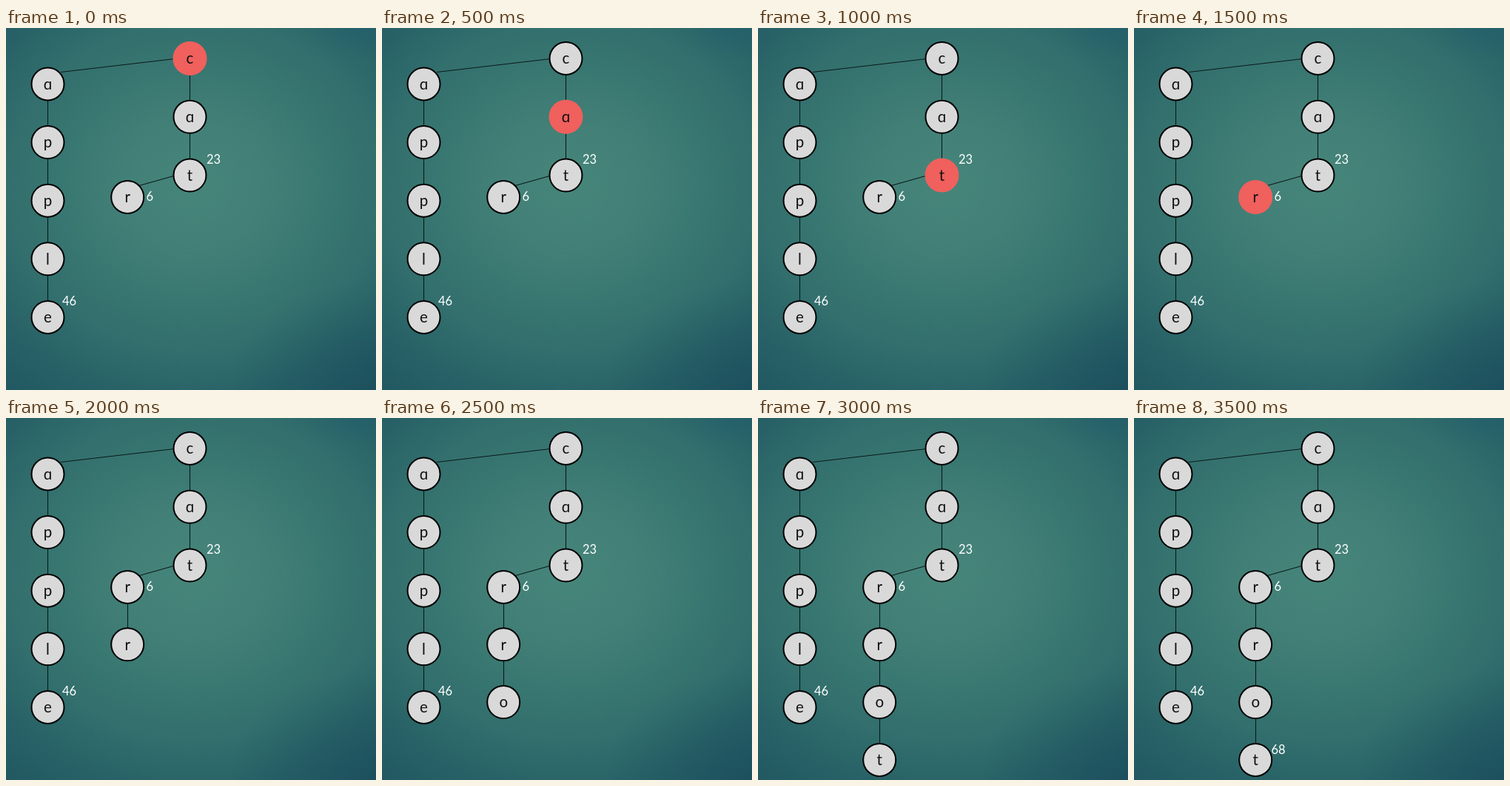
These frames come from a looping animation (500 px wide and 488 px high, 4 s). An HTML page:

```html
<!DOCTYPE html>
<html lang="en">
<head>
<meta charset="utf-8">
<title>Trie insertion</title>
<style>
  html, body { margin: 0; width: 100%; height: 100%; overflow: hidden; }
  body {
    background:
      radial-gradient(ellipse 70px 40px at 475px 0, #23606e99, #23606e00),
      radial-gradient(ellipse 200px 150px at 500px 488px, #17485a88, #17485a00),
      radial-gradient(ellipse 420px 370px at 255px 212px,
        #46857a, #42817830 0, #42817800 0),
      radial-gradient(ellipse 420px 370px at 255px 212px,
        #46857a 0, #438178 20%, #3a7872 40%, #326f6d 60%, #286267 78%, #205660 100%);
  }
  svg { display: block; width: 500px; height: 488px; }
  text { font-family: Lato, "Noto Sans", sans-serif; }
  line { stroke: #0b1a1a; stroke-width: 1.1; }
  circle { fill: #d9d9d9; stroke: #000; stroke-width: 2; }
  .active circle { fill: #f0605d; stroke: #f0605d; }
  .letter { font-size: 20.5px; text-anchor: middle; fill: #111; }
  .count { font-size: 16.5px; fill: #fff; }
</style>
</head>
<body>
<svg viewBox="0 0 500 488"></svg>
<script>
const svg = document.querySelector('svg');
const STEP = 500, LOOP = 4000;
const timed = [];

function add(parent, tag, attrs, text = '') {
  const el = document.createElementNS('http://www.w3.org/2000/svg', tag);
  for (const key in attrs) el.setAttribute(key, attrs[key]);
  el.textContent = text;
  return parent.appendChild(el);
}

// "from" is the step at which an element appears
function show(el, from) {
  timed.push(step => el.setAttribute('visibility', step >= from ? 'visible' : 'hidden'));
}

function edge(x1, y1, x2, y2, from = 0) {
  show(add(svg, 'line', { x1, y1, x2, y2 }), from);
}

function node(letter, x, y, { from = 0, active = -1 } = {}) {
  const g = add(svg, 'g', {});
  add(g, 'circle', { cx: x, cy: y, r: 22 });
  add(g, 'text', { x, y: y + 7.3, class: 'letter' }, letter);
  show(g, from);
  timed.push(step => g.setAttribute('class', step === active ? 'active' : ''));
}

function count(value, x, y, from = 0) {
  show(add(svg, 'text', { x, y, class: 'count' }, value), from);
}

edge(74, 59.5, 228, 41.5);
edge(180, 212.5, 228, 199);
edge(56.5, 75, 56.5, 390);
edge(248.5, 41, 248.5, 198);
edge(164.5, 228, 164.5, 305, 4);
edge(164.5, 305, 164.5, 383, 5);
edge(164.5, 383, 164.5, 460, 6);

[...'ɑpple'].forEach((letter, i) => node(letter, 56.5, 75.5 + i * 78.6));
[...'cɑt'].forEach((letter, i) => node(letter, 248.5, 41 + i * 78.8, { active: i }));
node('r', 164.2, 228, { active: 3 });
[...'rot'].forEach((letter, i) => node(letter, 164.2, 305.3 + i * 77.8, { from: i + 4 }));

count('46', 76, 374);
count('23', 271, 182.5);
count('6', 189.5, 233);
count('68', 185.5, 452.5, 7);

function frame() {
  const step = Math.floor(performance.now() % LOOP / STEP);
  timed.forEach(update => update(step));
  requestAnimationFrame(frame);
}
frame();
</script>
</body>
</html>
```
